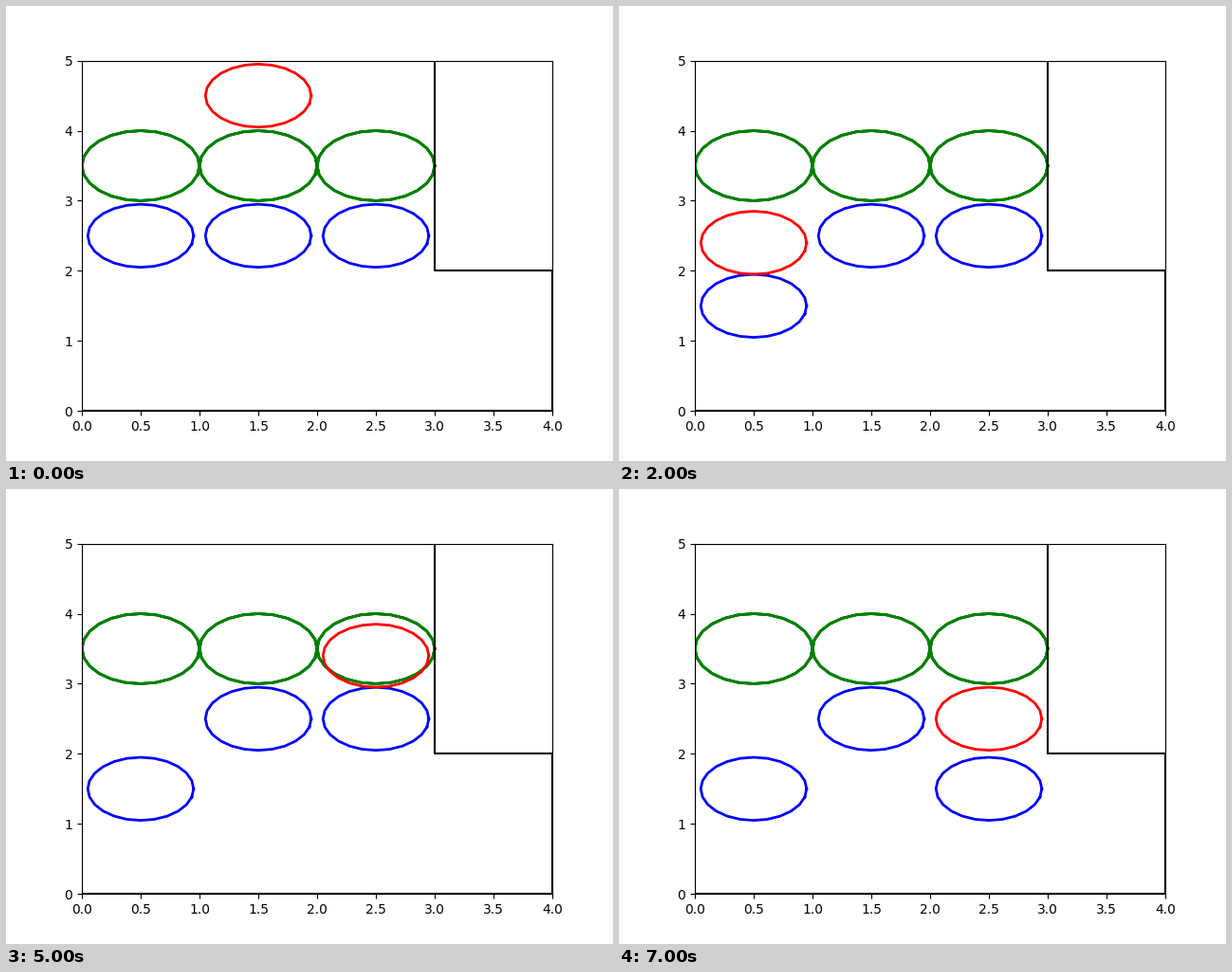
Animation, 640 px wide and 480 px high, one loop 8 s. Source, as a matplotlib script:

```python
import numpy as np
import matplotlib.pyplot as plt
from matplotlib.animation import FuncAnimation

STEP_MS = 1000
STEPS = 8
CYCLE = 4           # above, pressing in, pushing down, resting
VISITS = (1, 0, 2)  # columns the red ring works on, in order
RADIUS = 0.45
ANGLES = np.arange(0, 2 * np.pi - 0.01, np.pi / 12)


def closed(x, y):
    """Outline of the points, with the closing edge as its own stroke."""
    return [np.concatenate([v, [np.nan, v[-1], v[0]]]) for v in (x, y)]


def ring_points(x, y, radius=RADIUS):
    return closed(x + radius * np.cos(ANGLES), y + radius * np.sin(ANGLES))


def red_center(step):
    phase = step % CYCLE
    column = VISITS[(step + CYCLE - 1) // CYCLE]
    overlap = 0.1 if phase in (1, 2) else 0
    return column + 0.5, 4.5 - min(phase, 2) - overlap


def blue_center(column, step):
    push_step = (VISITS.index(column) - 1) * CYCLE + 2
    pushed = column != VISITS[0] and step >= push_step
    return column + 0.5, 1.5 if pushed else 2.5


fig, ax = plt.subplots(figsize=(6.4, 4.8), dpi=100)
ax.set_xlim(0, 4)
ax.set_ylim(0, 5)

# Repeated strokes firm up the edges of the fixed rings.
for _ in range(3):
    for column in range(3):
        ax.plot(*ring_points(column + 0.5, 3.5, 0.5), color="green", linewidth=2)
ax.plot(*closed([0, 0, 4, 4, 3, 3], [5, 0, 0, 2, 2, 5]),
        color="black", linewidth=1.5)
blues = [ax.plot([], [], color="blue", linewidth=2)[0] for _ in range(3)]
red, = ax.plot([], [], color="red", linewidth=2)


def update(step):
    red.set_data(*ring_points(*red_center(step)))
    for column, line in enumerate(blues):
        line.set_data(*ring_points(*blue_center(column, step)))
    return [red, *blues]


anim = FuncAnimation(fig, update, frames=STEPS, interval=STEP_MS,
                     repeat=True, repeat_delay=0, blit=False)
plt.show()
```
